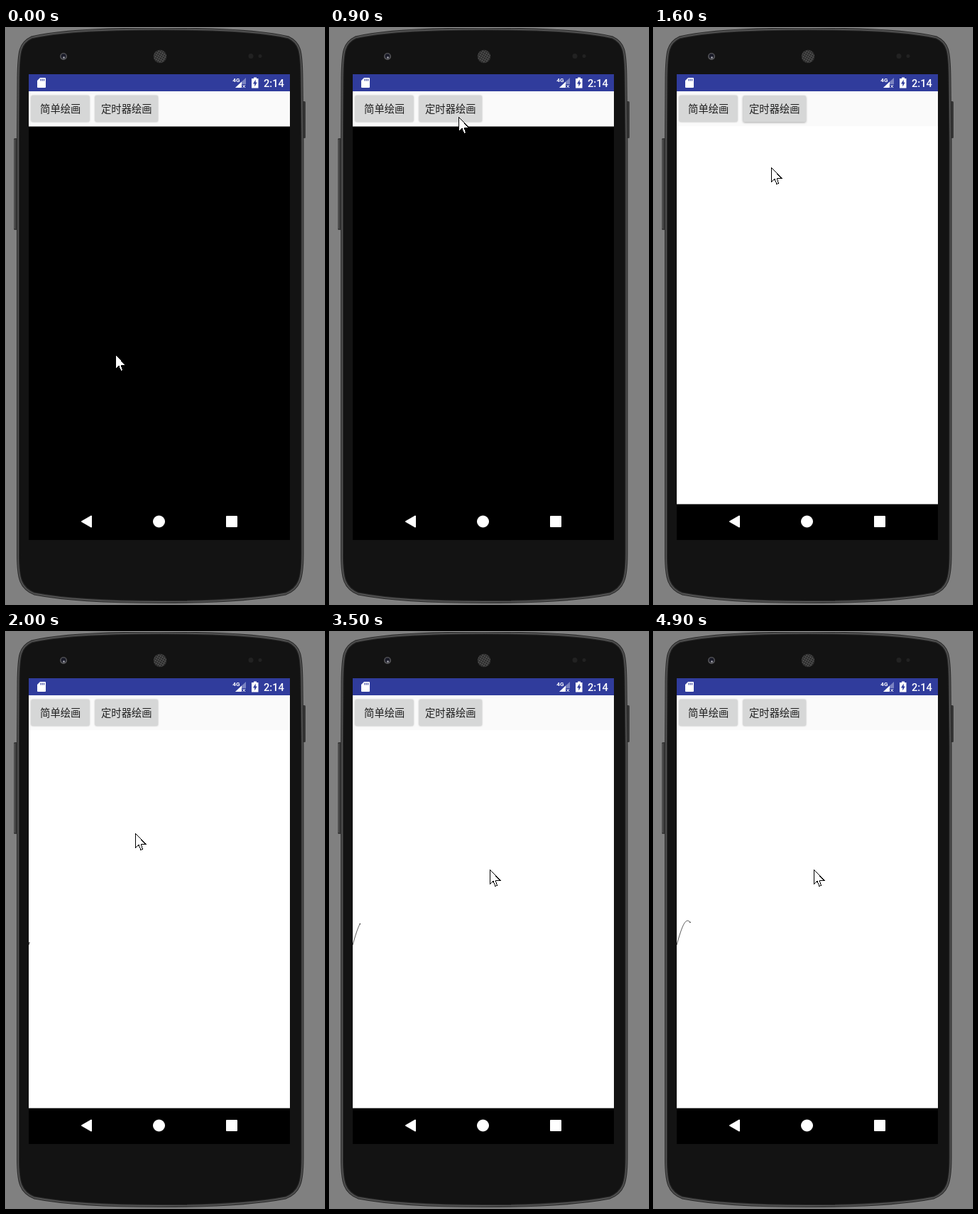
Recreate the animation shown at these times as an HTML page. Size 448 by 810 pixels, loop 5000 ms.

```html
<!DOCTYPE html>
<html lang="zh-CN">
<head>
<meta charset="utf-8">
<title>定时器绘画</title>
<style>
  html, body { margin: 0; width: 100%; height: 100%; overflow: hidden; background: #808080; }
  svg { display: block; }
  .label { font: 14.3px "Noto Sans CJK SC", "Noto Sans CJK", sans-serif; fill: #202020; text-anchor: middle; }
  .status { font-family: Roboto, sans-serif; fill: #fff; }
  .key { fill: #d6d7d7; filter: drop-shadow(0 .5px 1px #0004); }
  .key.raised { filter: drop-shadow(0 1.5px 1.5px #0005); }
</style>
</head>
<body>
<svg width="448" height="810" viewBox="0 0 448 810">
  <defs>
    <path id="body" d="M17 160 L17.5 70 C18 32 20 21 36 13.5 C70 5 140 1.5 217 1.5 C294 1.5 364 5 398 13.5
      C414 21 416 32 416.5 70 L417.5 160 V740 C417.5 775 413 788 394 795.5 C350 804 280 807 217 807
      C154 807 84 804 40 795.5 C21 788 17 775 17 740 Z"/>
    <pattern id="mesh" width="3" height="3" patternUnits="userSpaceOnUse" patternTransform="rotate(30)">
      <circle cx="1.5" cy="1.5" r="1" fill="#686868"/>
    </pattern>
  </defs>

  <!-- Phone -->
  <rect x="11" y="155" width="7" height="129" rx="1.5" fill="#383838"/>
  <rect x="11.5" y="157" width="1.5" height="125" fill="#555"/>
  <rect x="416" y="103" width="6" height="52" rx="1.5" fill="#353535"/>
  <use href="#body" fill="#131313" stroke="#292929" stroke-width="4"/>
  <use href="#body" fill="none" stroke="#515151" stroke-width="1.8"/>
  <circle cx="81" cy="40" r="5" fill="#555558"/>
  <circle cx="81" cy="39.6" r="3.4" fill="#1a1b28"/>
  <circle cx="81.5" cy="41.5" r="1.3" fill="#b0b0b8"/>
  <circle cx="217" cy="40" r="9.5" fill="#242424"/>
  <circle cx="217" cy="40" r="9" fill="url(#mesh)"/>
  <g fill="#222"><circle cx="345" cy="39.5" r="3.5"/><circle cx="358" cy="39.5" r="2.5"/></g>

  <!-- Status bar -->
  <rect x="32" y="65" width="368" height="655"/>
  <rect x="32" y="65" width="368" height="24" fill="#303c9c"/>
  <path d="M48 70 H55 Q56 70 56 71 V83 Q56 84 55 84 H45 Q44 84 44 83 V74 Z" fill="#fff"/>
  <path d="M49 71.5 V74.5 M51.3 71.5 V74.5 M53.6 71.5 V74.5" stroke="#303c9c" stroke-width="1.1"/>
  <path d="M323 84 L338 70 V84 Z" fill="#7b84c2"/>
  <path d="M323 84 L332 75.5 V84 Z" fill="#fff"/>
  <rect x="332" y="79" width="6" height="5.5" fill="#303c9c"/>
  <path d="M333.5 80 L337 84 M337 80 L333.5 84" stroke="#fff"/>
  <text class="status" x="319.3" y="76.3" font-size="8" font-weight="700">4G</text>
  <path d="M349 69.5 H353 V71 H355.5 V84.5 H346 V71 H349 Z" fill="#fff"/>
  <path d="M351.7 72.5 L348 78.5 H350.3 V82.5 L353.7 76.5 H351.7 Z" fill="#303c9c"/>
  <text class="status" x="363" y="82.5" font-size="14.6" font-weight="500">2:14</text>

  <!-- Toolbar -->
  <rect x="32" y="89" width="368" height="49.5" fill="#fafafa"/>
  <rect class="key" x="35.5" y="95" width="82" height="37" rx="2"/>
  <rect class="key" id="timerKey" x="125.5" y="95" width="88.5" height="37" rx="2"/>
  <text class="label" x="76.7" y="119">简单绘画</text>
  <text class="label" x="169.8" y="119">定时器绘画</text>

  <!-- Drawing surface -->
  <g id="surface">
    <rect x="32" y="138" width="368" height="531.6" fill="#fff"/>
    <path id="wave" fill="none" stroke="#000" stroke-width=".7"/>
    <circle id="pen" r=".7"/>
  </g>

  <!-- Navigation bar -->
  <g fill="#fff" stroke="#fff" stroke-linejoin="round">
    <path d="M107 694 L120 686.5 V701.5 Z" stroke-width="2"/>
    <circle cx="215.5" cy="694" r="8"/>
    <rect x="311" y="687" width="14" height="14" stroke-width="2"/>
  </g>

  <path id="cursor" d="M.5 .5 V20.5 L5 16.5 L8 23.5 L10.5 22.5 L8 15 H14.5 Z"
    fill="#fff" stroke="#000" shape-rendering="crispEdges"/>
</svg>
<script>
const LOOP = 5000, TICK = 100;
const SURFACE_ON = 1600, WAVE_START = 2000;
const pauses = [2700, 3400, 3800, 4200];
// time, x, y of the pointer tip
const pointer = [
  [0, 154, 459], [500, 203, 146], [600, 200, 138], [1000, 175, 120], [1500, 175, 120],
  [1600, 165, 196], [1800, 172, 255], [1900, 172, 255], [2000, 182, 283], [2500, 225, 334], [LOOP, 225, 334]
];
const el = id => document.getElementById(id);
const waveY = x => 440 - 34 * Math.sin((x - 32) / 61.4 * 2 * Math.PI);

function pointerAt(t) {
  const i = pointer.findIndex(p => p[0] > t);
  const [t0, x0, y0] = pointer[i - 1], [t1, x1, y1] = pointer[i];
  const k = (t - t0) / (t1 - t0);
  return [x0 + (x1 - x0) * k, y0 + (y1 - y0) * k].map(Math.round);
}

function drawWave(t) {
  const drawing = t >= WAVE_START;
  el("wave").style.display = el("pen").style.display = drawing ? "" : "none";
  if (!drawing) return;
  const steps = (t - WAVE_START) / TICK - pauses.filter(p => p <= t).length;
  const end = 32.9 + 0.72 * steps;
  let d = `M32 ${waveY(32)}`;
  for (let x = 32.3; x < end; x += 0.3) d += `L${x} ${waveY(x)}`;
  el("wave").setAttribute("d", `${d}L${end} ${waveY(end)}`);
  el("pen").setAttribute("cx", end);
  el("pen").setAttribute("cy", waveY(end));
}

function render() {
  const t = Math.floor(performance.now() % LOOP / TICK) * TICK;
  el("surface").style.display = t >= SURFACE_ON ? "" : "none";
  el("timerKey").classList.toggle("raised", t >= SURFACE_ON && t < 1800);
  el("cursor").setAttribute("transform", `translate(${pointerAt(t)})`);
  drawWave(t);
  requestAnimationFrame(render);
}
render();
</script>
</body>
</html>
```
